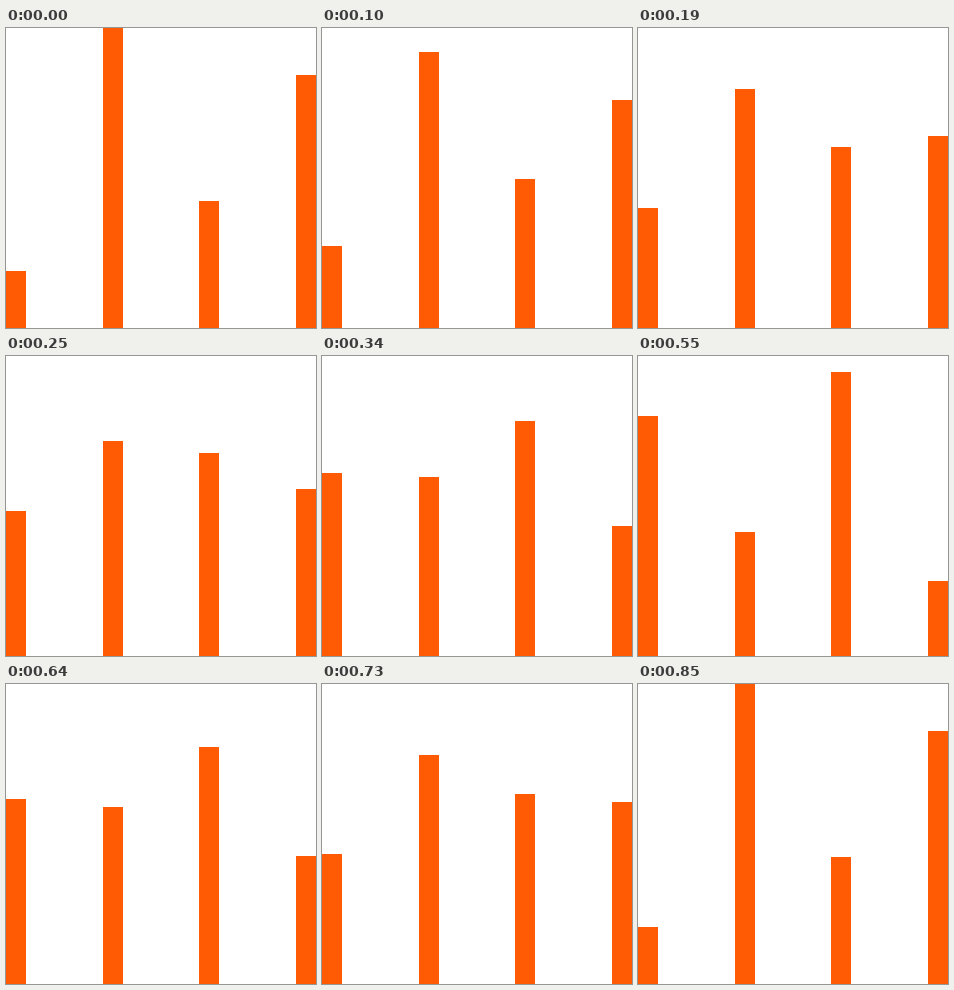
Write an HTML page with a canvas that moves like this. It is 310x300 px and loops after 880 ms.

```html
<!DOCTYPE html>
<html>
<head>
<meta charset="utf-8">
<style>
  html, body { margin: 0; width: 100%; height: 100%; overflow: hidden; background: #fff; }
  canvas { display: block; }
</style>
</head>
<body>
<canvas width="310" height="300"></canvas>
<script>
const LOOP = 880, STEP = 30, LEAD = 40, RISE = 16, FALL = 11;
const ctx = document.querySelector("canvas").getContext("2d");

// x, resting top, top at the turning point
const bars = [
  [0, 243, 42],
  [97, 0, 194],
  [193, 173, 0],
  [290, 47, 243],
];

function progress(time) {
  const step = Math.max(0, Math.floor((time - LEAD) / STEP));
  return step <= RISE ? step / RISE : Math.max(0, 1 - (step - RISE) / FALL);
}

function draw() {
  const p = progress(performance.now() % LOOP);
  ctx.fillStyle = "#fff";
  ctx.fillRect(0, 0, 310, 300);
  ctx.fillStyle = "#ff5b05";
  for (const [x, from, to] of bars) {
    const top = Math.round(from + (to - from) * p);
    ctx.fillRect(x, top, 20, 300 - top);
  }
  requestAnimationFrame(draw);
}
draw();
</script>
</body>
</html>
```
